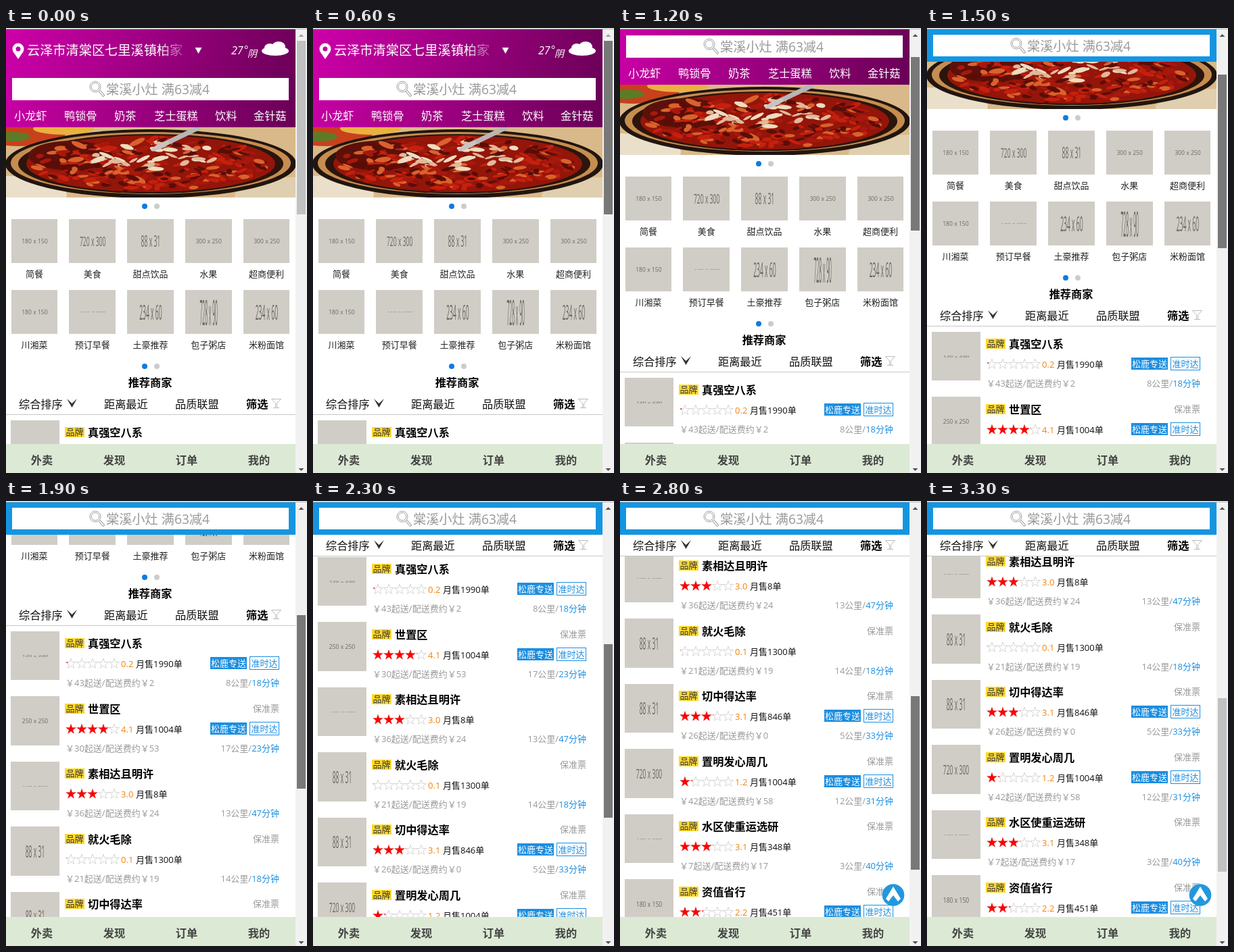
Write an HTML page with a canvas that moves like this. It is 445 px wide and 659 px high and loops after 6900 ms.

```html
<!DOCTYPE html>
<html lang="zh-CN">
<head>
<meta charset="utf-8">
<title>外卖</title>
<style>
html, body { margin: 0; width: 100%; height: 100%; overflow: hidden; background: #fff; }
canvas { display: block; }
</style>
</head>
<body>
<canvas id="stage" width="445" height="659"></canvas>
<script>
const ctx = document.getElementById('stage').getContext('2d');
const LOOP = 6900, PAGE_W = 428, BLUE = '#1595e1', GREY = '#999', TILE = '#d0cdc6';
const FONT = '"Open Sans", "Noto Sans CJK SC", "Noto Sans CJK", sans-serif';

// [time, scroll offset]; the thumb is dragged in 100 ms steps
const DRAG = [[700, 0], [1000, 36], [1300, 76], [1500, 131], [1700, 262], [1900, 388],
  [2050, 440], [2300, 498], [2600, 628], [2800, 696], [3000, 702]];

const CATEGORIES = [['小龙虾', 12], ['鸭锁骨', 86], ['奶茶', 160], ['芝士蛋糕', 219], ['饮料', 309], ['金针菇', 366]];
const TILES = [
  ['简餐', 180, 150], ['美食', 720, 300], ['甜点饮品', 88, 31], ['水果', 300, 250], ['超商便利', 300, 250],
  ['川湘菜', 180, 150], ['预订早餐', 120, 600], ['土豪推荐', 234, 60], ['包子粥店', 728, 90], ['米粉面馆', 234, 60]];
// name, image size, rating, sales, minimum, fee, km, minutes, express, guaranteed
const SHOPS = [
  ['真强空八系', 120, 240, 0.2, 1990, 43, 2, 8, 18, 1, 0],
  ['世置区', 250, 250, 4.1, 1004, 30, 53, 17, 23, 1, 1],
  ['素相达且明许', 120, 600, 3.0, 8, 36, 24, 13, 47, 0, 0],
  ['就火毛除', 88, 31, 0.1, 1300, 21, 19, 14, 18, 0, 1],
  ['切中得达率', 88, 31, 3.1, 846, 26, 0, 5, 33, 1, 1],
  ['置明发心周几', 720, 300, 1.2, 1004, 42, 58, 12, 31, 1, 1],
  ['水区使重运选研', 120, 600, 3.1, 348, 7, 17, 3, 40, 0, 1],
  ['资值省行', 180, 150, 2.2, 451, 18, 6, 9, 26, 1, 1]];

function rect(x, y, w, h, color) {
  ctx.fillStyle = color;
  ctx.fillRect(x, y, w, h);
}

function oval(x, y, rx, ry, color, angle = 0) {
  ctx.fillStyle = color;
  ctx.beginPath();
  ctx.ellipse(x, y, rx, ry, angle, 0, 7);
  ctx.fill();
}

function trace(points, close) {
  ctx.beginPath();
  points.forEach(([x, y]) => ctx.lineTo(x, y));
  if (close) ctx.closePath();
}

function shape(points, color) {
  trace(points, true);
  ctx.fillStyle = color;
  ctx.fill();
}

function line(points, color, width, close) {
  trace(points, close);
  ctx.strokeStyle = color;
  ctx.lineWidth = width;
  ctx.stroke();
}

// y is the vertical middle of the glyphs
function text(str, x, y, size, color, align = 'left', style = '') {
  ctx.font = `${style} ${size}px ${FONT}`;
  ctx.textAlign = align;
  ctx.fillStyle = color;
  ctx.fillText(str, x, y + size * 0.37);
  return ctx.measureText(str).width;
}

function clipped(x, y, w, h, paint) {
  ctx.save();
  ctx.beginPath();
  ctx.rect(x, y, w, h);
  ctx.clip();
  paint();
  ctx.restore();
}

// A placeholder image of imgW x imgH squeezed into a box whose edges snap to pixels
function placeholder(x, y, w, h, imgW, imgH) {
  const left = Math.floor(x), top = Math.floor(y), ratio = imgW / imgH * h / w;
  rect(left, top, Math.floor(x + w) - left, Math.floor(y + h) - top, TILE);
  ctx.save();
  ctx.translate(x + w / 2, y + h / 2);
  ctx.scale(1, ratio);
  text(`${imgW} x ${imgH}`, 0, 0, Math.min(8.6, 52 / ratio), '#6c6964', 'center');
  ctx.restore();
}

function pager(y) {
  oval(205, y, 4, 4, '#0f7be0');
  oval(223, y, 4, 4, '#ccc');
}

function star(cx, cy) {
  return Array.from({ length: 10 }, (_, i) => {
    const r = i % 2 ? 3.1 : 7.9, a = Math.PI * (i / 5 - 0.5);
    return [cx + r * Math.cos(a), cy + r * Math.sin(a)];
  });
}

function stars(x, y, rating) {
  for (let i = 0; i < 5; i++) line(star(x + 8 + i * 16, y), '#ccc', 0.8, true);
  clipped(x, y - 9, rating * 16, 18, () => {
    for (let i = 0; i < 5; i++) shape(star(x + 8 + i * 16, y), '#f00');
  });
}

function searchBox(y, h) {
  rect(9, y, 409, h, '#fff');
  line([[138, y + 19], [145, y + 27]], GREY, 3.6);
  line([[138, y + 19], [144.4, y + 26.3]], '#fff', 1.8);
  ctx.strokeStyle = GREY;
  ctx.lineWidth = 0.9;
  for (const r of [8, 5.8]) {
    ctx.beginPath();
    ctx.arc(132, y + 13, r, 0, 7);
    ctx.stroke();
  }
  text('棠溪小灶 满63减4', 148, y + 17, 19.2, GREY);
}

function header(y) {
  const bg = ctx.createLinearGradient(0, y + 20, 415, y + 125);
  bg.addColorStop(0, '#cc00a8');
  bg.addColorStop(1, '#6c0058');
  rect(0, y, PAGE_W, 145, bg);

  shape([[10.5, y + 33], [25.5, y + 33], [18, y + 44]], '#fff');
  oval(18, y + 29, 8.5, 8.5, '#fff');
  oval(18, y + 29, 3.5, 3.5, '#c400a2');
  const fade = ctx.createLinearGradient(225, 0, 264, 0);
  fade.addColorStop(0, '#fff');
  fade.addColorStop(1, 'rgba(255,255,255,.2)');
  text('云泽市清棠区七里溪镇柏家', 31, y + 31, 19.2, fade);
  shape([[279.5, y + 27], [289.5, y + 27], [284.5, y + 36]], '#fff');

  text('27', 333, y + 31, 16, '#fff', 'left', 'italic');
  text('°', 351, y + 30, 16, '#fff', 'left', 'italic');
  text('阴', 357, y + 36, 14, '#fff', 'left', 'italic');
  oval(398, y + 32, 20, 7, '#fff');
  oval(390, y + 27, 8, 6, '#fff');
  oval(403, y + 26, 10, 8, '#fff');

  searchBox(y + 72, 33);
  CATEGORIES.forEach(([name, x]) => text(name, x, y + 128, 16.2, '#fff'));
}

function dish(y) {
  const rand = n => Math.abs(Math.sin(n * 127.1) * 43758.5) % 1;
  clipped(0, y, PAGE_W, 104, () => {
    rect(0, y, PAGE_W, 104, '#d9b98a');
    oval(20, y + 6, 70, 22, '#c8401c');
    oval(10, y + 14, 26, 7, '#5f7a26');
    oval(85, y + 2, 45, 9, '#eab040');
    oval(0, y + 100, 90, 28, '#eadfca');
    oval(428, y + 102, 90, 28, '#e0cfae');
    oval(214, y + 54, 215, 51, '#21150f');
    oval(214, y + 53, 207, 46, '#c58d50');
    oval(214, y + 54, 196, 44, '#2c150c');
    oval(214, y + 54, 184, 42, '#94150a');
    oval(95, y + 42, 62, 22, '#5c1009');
    for (let i = 1; i < 260; i++) {
      const a = rand(i) * 6.28, r = Math.sqrt(rand(i + 300));
      const dx = r * Math.cos(a), dy = r * Math.sin(a);
      const creamy = Math.hypot(dx - 0.05, dy + 0.35) < 0.55 && i % 5 > 1;
      const color = creamy ? ['#efdcc0', '#e2b99a'][i % 2] : ['#c5200e', '#5a0d07', '#a8180c', '#d9622c'][i % 4];
      oval(214 + 172 * dx, y + 54 + 38 * dy, 4 + 9 * rand(i + 600), 1.5 + 2.5 * rand(i + 900), color, rand(i + 1200) - 0.5);
    }
    line([[232, y + 26], [286, y]], '#b9b4b6', 7);
    oval(228, y + 28, 15, 4, '#c9c4c4', -0.45);
  });
}

function sortBar(y) {
  rect(0, y, PAGE_W, 31, '#fff');
  rect(0, y + 31, PAGE_W, 1, '#c8c8c8');
  const mid = y + 16.5;
  text('综合排序', 19, mid, 16.2, '#111');
  text('距离最近', 145, mid, 16.2, '#111');
  text('品质联盟', 250, mid, 16.2, '#111');
  text('筛选', 355, mid, 16.2, '#000', 'left', 'bold');
  shape([[90, y + 8], [97.5, y + 15], [105, y + 8], [97.5, y + 21]], '#333');
  line([[392.5, y + 8.5], [406.5, y + 8.5], [400.5, y + 15], [400.5, y + 21.5], [398.5, y + 21.5], [398.5, y + 15]], '#bbb', 1, true);
  line([[395, y + 21.5], [404, y + 21.5]], '#bbb', 1);
}

function shop([name, imgW, imgH, rating, sales, min, fee, km, minutes, express, guaranteed], top) {
  const y = Math.round(top);
  placeholder(7, top, 72, 72.5, imgW, imgH);
  rect(87, y + 10, 29, 15, '#ffd930');
  text('品牌', 88.5, y + 17.5, 13, '#333');
  text(name, 121, y + 18, 16.2, '#000', 'left', 'bold');
  if (guaranteed) text('保准票', 404, y + 17, 13, GREY, 'right');

  stars(88, y + 48, rating);
  text(rating.toFixed(1), 170, y + 48, 13, '#f5820a');
  text(`月售${sales}单`, 192, y + 48, 13, '#111');
  if (express) {
    rect(302, y + 38, 54, 18, '#1b8ee0');
    text('松鹿专送', 303, y + 47.5, 13, '#fff');
    ctx.strokeStyle = '#1b8ee0';
    ctx.lineWidth = 1;
    ctx.strokeRect(360.5, y + 37.5, 43, 19);
    text('准时达', 362.5, y + 47.5, 13, '#1b8ee0');
  }

  text(`￥${min}起送/配送费约￥${fee}`, 88, y + 76, 13, GREY);
  const w = text(`${minutes}分钟`, 404, y + 76, 13, '#1b8ee0', 'right');
  text(`${km}公里/`, 404 - w, y + 76, 13, GREY, 'right');
}

function topButton() {
  oval(404, 583.5, 16.3, 16.3, '#2397de');
  shape([[404, 571], [415, 589], [411, 593], [404, 584], [397, 593], [393, 589]], '#fff');
}

function scrollbar(scroll, t) {
  rect(PAGE_W, 2, 17, 657, '#f1f1f1');
  const pressed = t >= 600 && t < 3300, hover = t >= 300 && t < 600;
  rect(430, 19 + Math.floor(scroll / 2.57), 13, 257, pressed ? '#787878' : hover ? '#a8a8a8' : '#c1c1c1');
  shape([[432.5, 13], [440.5, 13], [436.5, 9]], scroll ? '#505050' : '#a3a3a3');
  shape([[432.5, 652], [440.5, 652], [436.5, 656]], '#505050');
}

function scrollAt(t) {
  const step = Math.floor(t / 100) * 100;
  const i = DRAG.findIndex(([time]) => time > step);
  if (i === 0) return 0;
  if (i < 0) return DRAG[DRAG.length - 1][1];
  const [t0, s0] = DRAG[i - 1], [t1, s1] = DRAG[i];
  return Math.round(s0 + (s1 - s0) * (step - t0) / (t1 - t0));
}

function draw(t) {
  const scroll = scrollAt(t);
  rect(0, 0, 445, 659, '#fff');

  header(2 - scroll);
  dish(147 - scroll);
  pager(264 - scroll);
  TILES.forEach(([name, w, h], i) => {
    const x = 8 + i % 5 * 85.75, y = (i < 5 ? 283 : 388) - scroll;
    placeholder(x, y, 68.8, 65, w, h);
    text(name, x + 34, y + 81, 13, '#222', 'center');
  });
  pager(501 - scroll);
  text('推荐商家', 213, 525 - scroll, 16.2, '#000', 'center', 'bold');
  SHOPS.forEach((s, i) => shop(s, 581 + i * 96.5 - scroll));
  sortBar(Math.max(50, 541 - scroll));

  if (scroll >= 64) {
    rect(0, 2, PAGE_W, 48, BLUE);
    searchBox(10, 32);
  }
  if (scroll > 600) topButton();

  rect(0, 616, PAGE_W, 43, '#dcead5');
  ['外卖', '发现', '订单', '我的'].forEach((name, i) =>
    text(name, 53 + i * 107, 640.5, 16.2, '#444', 'center', 'bold'));

  scrollbar(scroll, t);
  rect(0, 0, 445, 1, '#f4f4f4');
  rect(0, 1, 445, 1, '#b4b4b4');
}

function tick() {
  draw(performance.now() % LOOP);
  requestAnimationFrame(tick);
}
tick();
</script>
</body>
</html>
```
